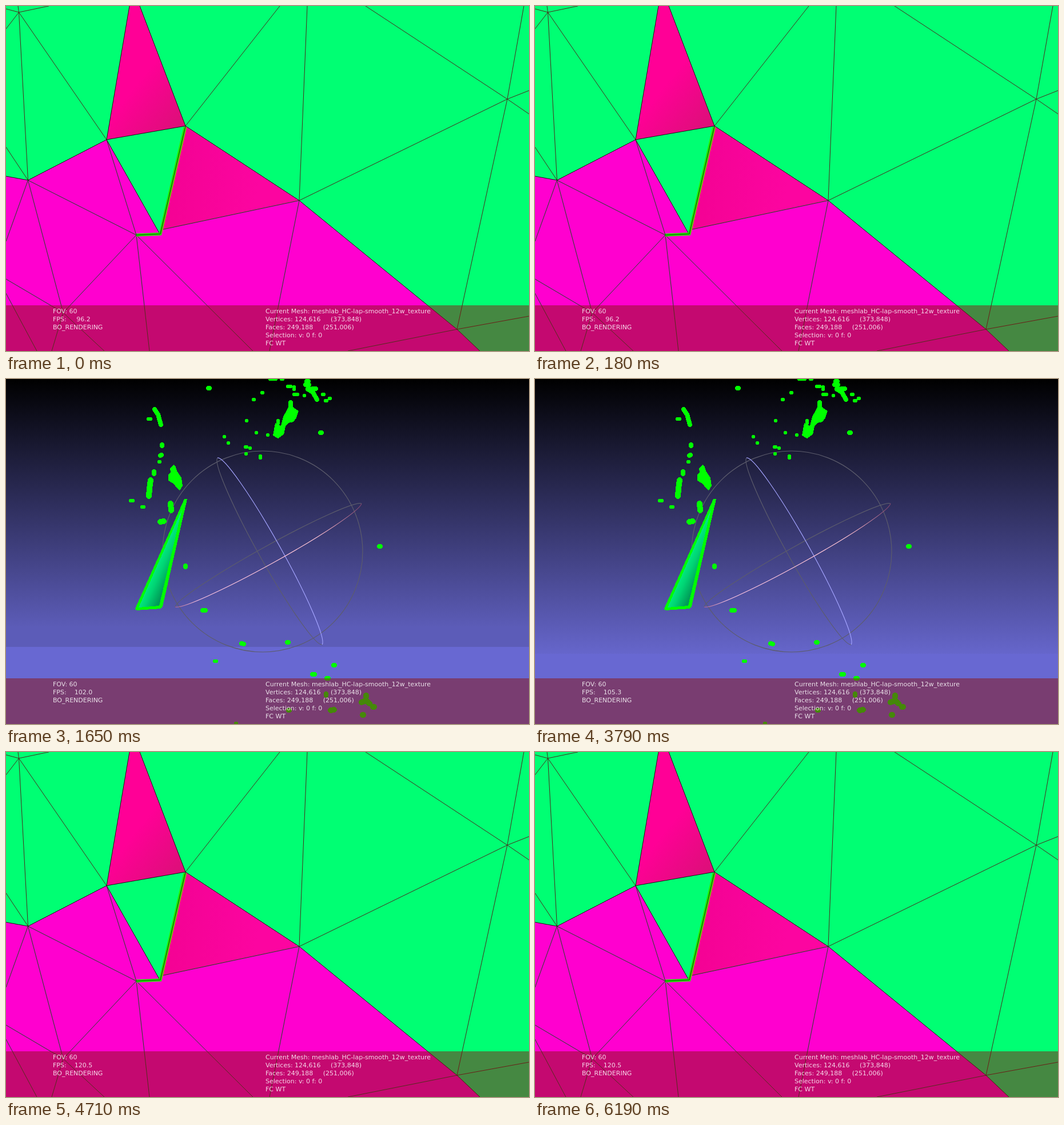
Write an HTML page that moves like this. It is 915 px wide and 604 px high and loops after 6720 ms.

```html
<!DOCTYPE html>
<html lang="en">
<head>
<meta charset="utf-8">
<title>Mesh hole views</title>
<style>
  html, body { margin: 0; height: 100%; overflow: hidden; background: #000; }
  svg { display: block; width: 100vw; height: 100vh; }
  path, rect, polygon { shape-rendering: crispEdges; }
  .line { fill: none; stroke-width: 1; shape-rendering: auto; }
  .blob { fill: none; stroke: #0f0; stroke-linecap: round; stroke-linejoin: round; }
  .orbit { fill: none; stroke-width: 1.2; shape-rendering: auto; }
  text { font: 11px "DejaVu Sans", Verdana, sans-serif; fill: #fff; fill-opacity: .84; white-space: pre; }
</style>
</head>
<body>
<svg viewBox="0 0 915 604" preserveAspectRatio="none">
  <defs>
    <linearGradient id="sky" x2="0" y2="604" gradientUnits="userSpaceOnUse" x1="0" y1="0">
      <stop stop-color="#000"/><stop offset="1" stop-color="#8080ff"/>
    </linearGradient>
    <linearGradient id="upper" gradientUnits="userSpaceOnUse" x1="222" y1="145" x2="306" y2="212">
      <stop stop-color="#ff0096"/><stop offset="1" stop-color="#dc0f78"/>
    </linearGradient>
    <linearGradient id="lower" gradientUnits="userSpaceOnUse" x1="290" y1="300" x2="440" y2="325">
      <stop stop-color="#f40294"/><stop offset="1" stop-color="#fc05a0"/>
    </linearGradient>
    <linearGradient id="cone" gradientUnits="userSpaceOnUse" x1="250" y1="345" x2="281" y2="359">
      <stop stop-color="#00f284"/><stop offset=".45" stop-color="#00d474"/><stop offset="1" stop-color="#009c58"/>
    </linearGradient>
    <linearGradient id="pinkArc" gradientUnits="userSpaceOnUse" x1="296" y1="0" x2="622" y2="0">
      <stop stop-color="#a8648c"/><stop offset=".12" stop-color="#f8c0e0"/>
      <stop offset=".75" stop-color="#ffc4d4"/><stop offset="1" stop-color="#80446c"/>
    </linearGradient>
  </defs>

  <g id="mesh">
    <rect width="915" height="604" fill="#00ff73"/>
    <polygon fill="#ff00cf" points="0,298 38,305 176,234 270,400 275,391 513,340.5 789,566 829,604 0,604"/>
    <polygon fill="url(#upper)" points="216,0 234,0 314,210 176,234"/>
    <polygon fill="url(#lower)" points="314,210 513,340.5 273,392"/>
    <path class="line" stroke="#4a2a1c" d="M0 5L22.5 11L75 0M21 0L22.5 11L0 40M176 234L22.5 11L38.5 305L0 247
      M314 210L479 0M527 0L513 340.5L877 163L629 0M906 0L877 163L915 148M789 566L877 163L915 189M789 566L915 543"/>
    <path class="line" stroke="#1c4a24" d="M0 412L38.5 305L228 401L176 234M38.5 305L100 537L228 401L251 604
      M228 401L432 604M0 478L100 537L172 604M100 537L80 604M0 503L54 604M275 391L513 340.5L461 604M789 566L598 604"/>
    <path class="line" stroke="#1c1418" d="M0 298L38.5 305L176 234L269 399M216 0L176 234L314 210L234 0
      M314 210L513 340.5L789 566L829 604"/>
    <path class="line" stroke="#20f000" style="stroke-width:5" d="M313 212L270 399L228 401"/>
    <path class="line" stroke="#a8a010" d="M316 212L273 396"/>
    <path class="line" stroke="#183010" d="M314 210L270 399L228 401"/>
  </g>

  <g id="hole">
    <rect width="915" height="604" fill="url(#sky)"/>
    <rect id="midBand" y="433" width="915" height="36" fill="#5c5cb8"/>
    <rect id="lowBand" width="915" height="135" fill="#6868d2"/>
    <g stroke="#5c5c6c">
      <ellipse class="orbit" cx="449" cy="302" rx="175" ry="176" fill="none"/>
      <path class="orbit" d="M553 465A187.5 20 60.8 0 1 370 138"/>
      <path class="orbit" d="M296 399A187 17 -29 0 1 622 218"/>
    </g>
    <path class="orbit" stroke="#a4a4ff" d="M370 138A187.5 20 60.8 0 1 553 465"/>
    <path class="orbit" stroke="url(#pinkArc)" d="M622 218A187 17 -29 0 1 296 399"/>

    <polygon fill="#0f0" points="312,210 317,210 274,398 271,402 228,405 226,402"/>
    <polygon fill="url(#cone)" points="308,228 268,397 232,400"/>

    <path class="blob" stroke-width="6" d="M448 24h1M433 36h1M421 73h0M438 94h0M458 98h0M382 101h0M389 112h0M419 119h2
      M427 121h0M420 131h0M445 135v3M268 145h1M238 224h3M365 494h3M218 213h4M249 70h4M462 0h10M482 0h2
      M493 13h5M504 14v4M504 27h6M522 29h0M554 27h2M559 38h2M566 34h1M402 603h1M476 73v4"/>
    <path class="blob" stroke-width="8" d="M354 16h2M550 94h2M653 293h2M314 327v2M344 405h5M412 463l4 1M492 461h2
      M573 501h2M536 517h4M561 524h3M270 134l2 -1M273 115v2M259 162v4M494 580h2M560 551v3M260 53L266 62L271 80
      M524 10h6L528 18L537 23L544 36M536 17h6M526 4h3M498 41v5"/>
    <path class="blob" stroke-width="10" d="M288 218l1 12M253 177L251 192L250 205M270 250l6 -1M568 580l6 -1
      M624 588h1M642 574h2M630 554v2M622 566l8 -3l6 5"/>
    <polygon fill="#0f0" points="293,150 297,154 299,161 307,173 309,187 304,195 299,191 293,183 284,178 284,167 288,164 287,156"/>
    <polygon fill="#0f0" points="497,42 503,50 512,56 508,68 503,75 494,77 489,83 486,97 476,104 467,99 471,77 481,82 485,66 491,55"/>
  </g>

  <rect y="524" width="915" height="80" fill="#8a1212" fill-opacity=".5"/>
  <g id="info"></g>
</svg>
<script>
  const LOOP = 6720;
  // start time, frames per second shown, top of the lowest sky band (0 = mesh view)
  const VIEWS = [
    [0, "  96.2", 0],
    [1650, " 102.0", 469],
    [2710, " 103.1", 0],
    [3790, " 105.3", 481],
    [4710, " 120.5", 0]
  ];
  const get = id => document.getElementById(id);

  function addText(x, row, content) {
    const el = document.createElementNS("http://www.w3.org/2000/svg", "text");
    el.setAttribute("x", x);
    el.setAttribute("y", 538 + row * 14);
    el.textContent = content;
    get("info").append(el);
    return el;
  }

  addText(82, 0, "FOV: 60");
  const fps = addText(82, 1, "");
  addText(82, 2, "BO_RENDERING");
  [
    "Current Mesh: meshlab_HC-lap-smooth_12w_texture",
    "Vertices: 124,616     (373,848)",
    "Faces: 249,188     (251,006)",
    "Selection: v: 0 f: 0",
    "FC WT"
  ].forEach((line, row) => addText(454, row, line));

  function draw(now) {
    const time = now % LOOP;
    const [, rate, band] = VIEWS.findLast(view => time >= view[0]);
    fps.textContent = "FPS:   " + rate;
    get("mesh").style.display = band ? "none" : "";
    get("hole").style.display = band ? "" : "none";
    get("midBand").style.display = band === 469 ? "" : "none";
    get("lowBand").setAttribute("y", band);
    requestAnimationFrame(draw);
  }
  draw(0);
</script>
</body>
</html>
```
